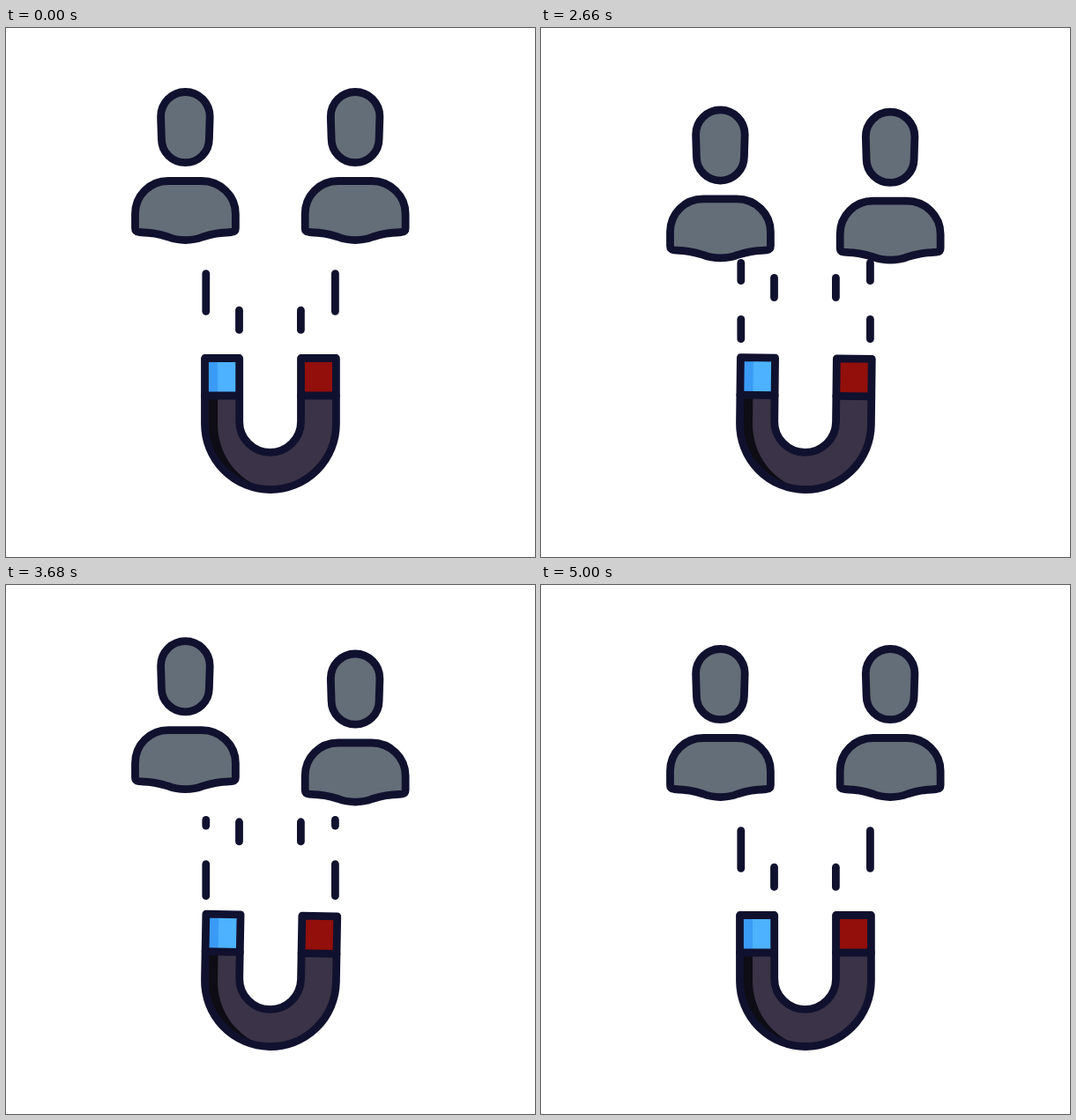
These frames come from a looping animation (600x600 px, 5120 ms). An HTML page with a canvas:

```html
<!DOCTYPE html>
<html lang="en">
<head>
<meta charset="utf-8">
<title>Magnet attracting people</title>
<style>
html, body { margin: 0; width: 100%; height: 100%; overflow: hidden; background: #fff; }
canvas { display: block; width: 600px; height: 600px; }
</style>
</head>
<body>
<canvas id="stage" width="600" height="600"></canvas>
<script>
const ctx = document.getElementById('stage').getContext('2d');
const LOOP = 5120, START = 2000, END = 5000, STEP = 30;
const INK = '#10112e', GREY = '#646e78', IRON = '#3b3347';
const LINE = 8.8;

const head = new Path2D(`M175.6 100.5 A27.8 28 0 0 1 231.2 100.5
  L230.4 126 A27 26.7 0 0 1 176.4 126 Z`);
const body = new Path2D(`M146.5 211 C146.5 190 163 173.5 184 173.5 H222
  C243 173.5 260.4 190 260.4 211 V227 Q260.4 231 256 231.5
  C241 232.5 235 233.2 223 237 C211 241.7 196 241.7 184 237
  C172 233.2 166 232.5 150.9 231.5 Q146.5 231 146.5 227 Z`);
const magnet = new Path2D(`M225.5 374.5 H264.7 V446.5
  A34.9 34.9 0 0 0 334.5 446.5 V374.5 H374.4 V449
  A74.45 74.5 0 0 1 225.5 449 Z`);
const shade = new Path2D(`M225.5 417 H240 V449 C240 480 258 508 287 520
  L287 523 A74.5 74.5 0 0 1 225.5 449 Z`);
const bands = new Path2D('M225.5 417 H264.7 M334.5 417 H374.4');

// Keys are [step, vertical offset]
const leftKeys = [[0, 0], [30, 24.7], [54, -9.4], [81, 24.7], [99.5, 0]];
const rightKeys = [[0, 0], [18, 24.7], [45, -9.4], [69, 24.7], [99.5, 0]];

function ease(keys, n) {
  for (let k = 1; k < keys.length; k++) {
    const [n0, v0] = keys[k - 1], [n1, v1] = keys[k];
    if (n < n1) {
      const u = (n - n0) / (n1 - n0);
      return v0 + (v1 - v0) * u * u * (3 - 2 * u);
    }
  }
  return 0;
}

function person(x, y) {
  ctx.save();
  ctx.translate(x, y);
  ctx.fillStyle = GREY;
  for (const part of [head, body]) {
    ctx.fill(part);
    ctx.stroke(part);
  }
  ctx.restore();
}

function segment(x, y0, y1) {
  ctx.beginPath();
  ctx.moveTo(x, y0);
  ctx.lineTo(x, y1);
  ctx.stroke();
}

// A dash that slides along a track and wraps round its ends
function dash(x, top, track, first, size, turns) {
  const s = (first + turns * track) % track;
  const over = s + size - track;
  segment(x, top + s, top + Math.min(s + size, track));
  if (over > 0) segment(x, top, top + over);
}

function drawMagnet(angle) {
  ctx.save();
  ctx.translate(300, 449);
  ctx.rotate(angle * Math.PI / 180);
  ctx.translate(-300, -449);
  ctx.fillStyle = IRON;
  ctx.fill(magnet);
  ctx.fillStyle = '#0e0c14';
  ctx.fill(shade);
  ctx.fillStyle = '#4db2ff';
  ctx.fillRect(225.5, 374.5, 39.2, 42.5);
  ctx.fillStyle = '#3a9bf7';
  ctx.fillRect(225.5, 374.5, 14.5, 42.5);
  ctx.fillStyle = '#920f0b';
  ctx.fillRect(334.5, 374.5, 39.9, 42.5);
  ctx.stroke(bands);
  ctx.stroke(magnet);
  ctx.restore();
}

function draw(t) {
  const n = t < START || t >= END ? 0 : Math.floor((t - START) / STEP);
  const m = n - 0.45;
  const live = m > 0 && n < 98;
  const turns = live ? 2.5 * Math.sin(Math.PI * m / 97.55) : 0;
  const angle = live ? -1.05 * Math.sin(2.009 * m) : 0;

  ctx.fillStyle = '#fff';
  ctx.fillRect(0, 0, 600, 600);
  ctx.strokeStyle = INK;
  ctx.lineWidth = LINE;
  ctx.lineCap = ctx.lineJoin = 'round';

  for (const x of [226.8, 373.4]) dash(x, 266.4, 86.3, 12.2, 42.7, turns);
  for (const x of [264.5, 334.4]) dash(x, 263.5, 92, 56.7, 22.2, turns);
  person(0, ease(leftKeys, n));
  person(192.7, ease(rightKeys, n));
  drawMagnet(angle);
}

const origin = performance.now();
function tick() {
  draw((performance.now() - origin) % LOOP);
  requestAnimationFrame(tick);
}
tick();
</script>
</body>
</html>
```
